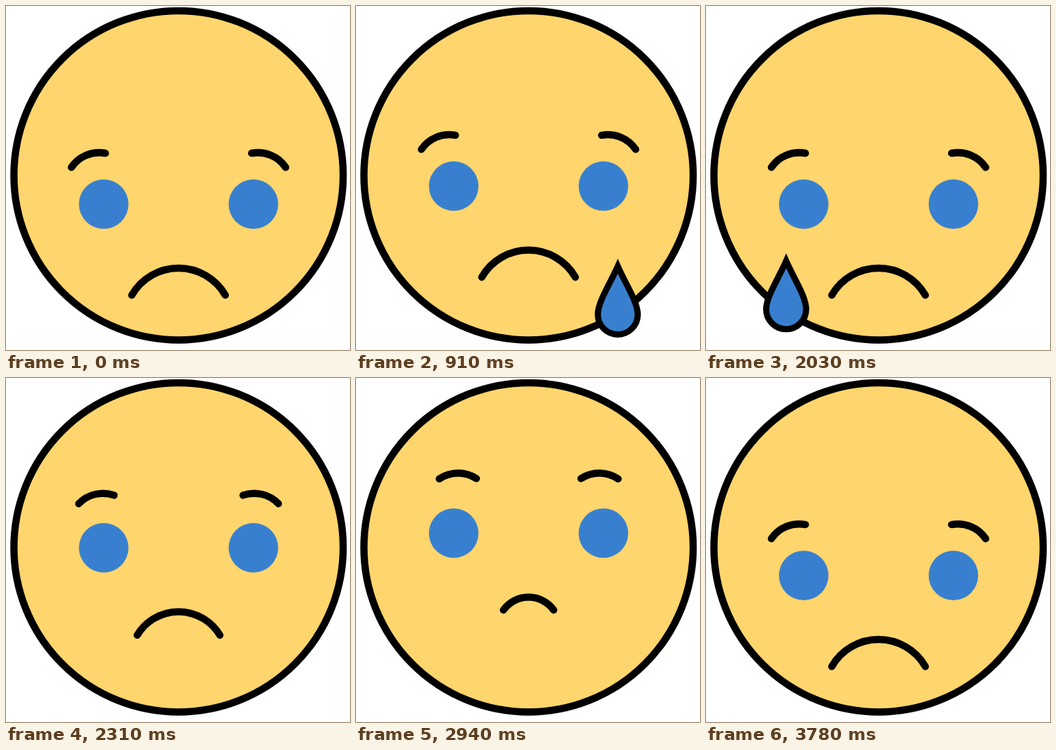
An HTML page for the animation above (3.85 s loop, 500x500 px).

```html
<!DOCTYPE html>
<html lang="en">
<head>
<meta charset="utf-8">
<title>Crying face</title>
<style>
  html, body { margin: 0; width: 100%; height: 100%; overflow: hidden; background: #fff; }
  svg { display: block; width: 100vw; height: 100vh; }
  .line { fill: none; stroke: #000; stroke-width: 10.5; stroke-linecap: round; }
  .blue { fill: #3880cf; }
  .tear { stroke: #000; stroke-width: 9; stroke-miterlimit: 8; }
</style>
</head>
<body>
<svg viewBox="0 0 500 500">
  <defs>
    <path id="drop" d="M0-70C12-43 29-18 29 0A29 29 0 0 1-29 0C-29-18-12-43 0-70Z"/>
  </defs>
  <circle cx="250.8" cy="246.2" r="239.3" fill="#ffd56d" stroke="#000" stroke-width="10.5"/>
  <g id="face">
    <circle class="blue" cx="142" cy="288" r="36"/>
    <circle class="blue" cx="359.6" cy="288" r="36"/>
    <path class="line" id="leftBrow"/>
    <path class="line" id="rightBrow"/>
    <path class="line" id="mouth"/>
  </g>
  <use href="#drop" class="blue tear" id="leftTear"/>
  <use href="#drop" class="blue tear" id="rightTear"/>
</svg>
<script>
const LOOP = 3850, STEP = 70;
const BOB_TIME = 1940, BOB_HEIGHT = 26.4;
const LIFT_START = 2030, LIFT_PEAK = 2715, LIFT_END = 3790, LIFT_HEIGHT = 69;
const RELAX_START = 2940;
const TEAR_TIME = 1050;

const $ = id => document.getElementById(id);
const mix = (a, b, k) => a + (b - a) * k;
const progress = (t, from, to) => Math.max(0, Math.min(1, (t - from) / (to - from)));
const smooth = k => (1 - Math.cos(Math.PI * k)) / 2;
const easeOut = k => Math.sin(Math.PI / 2 * k);

function arc(id, x1, y1, x2, y2, radius) {
  $(id).setAttribute('d', `M${x1} ${y1}A${radius} ${radius} 0 0 1 ${x2} ${y2}`);
}

function drawFace(t) {
  const bob = BOB_HEIGHT * smooth(2 * progress(t, 0, BOB_TIME));
  const rise = easeOut(progress(t, LIFT_START, LIFT_PEAK));
  const fall = progress(t, LIFT_PEAK, LIFT_END) ** 1.5;
  $('face').setAttribute('transform', `translate(0 ${-bob - LIFT_HEIGHT * (rise - fall)})`);

  const relax = smooth(progress(t, RELAX_START, LIFT_END));
  const level = smooth(progress(t, LIFT_START, 2660)) - relax;
  const outerY = mix(234.5, 209, level), innerY = mix(214, 208.5, level);
  arc('leftBrow', mix(95, 121, level), outerY, mix(144.5, 175, level), innerY, 49);
  arc('rightBrow', mix(357, 327, level), innerY, mix(406.5, 381, level), outerY, 49);

  const shrink = progress(t, 2100, RELAX_START) - relax;
  const half = mix(68, 36.5, shrink), sag = mix(39.3, 18.7, shrink), low = 381 + sag;
  arc('mouth', 250.8 - half, low, 250.8 + half, low, (half * half + sag * sag) / (2 * sag));
}

function drawTear(id, age, x, top, speed) {
  const opacity = progress(age, 0, 140) * progress(age, TEAR_TIME, TEAR_TIME - 70);
  $(id).setAttribute('transform', `translate(${x} ${top + speed * age})`);
  $(id).setAttribute('opacity', opacity);
}

function tick() {
  const t = Math.floor(performance.now() % LOOP / STEP) * STEP;
  drawFace(t);
  drawTear('rightTear', t - 140, 380.5, 381, 0.0875);
  drawTear('leftTear', t - 1260, 116.5, 361, 0.1035);
  requestAnimationFrame(tick);
}

tick();
</script>
</body>
</html>
```
